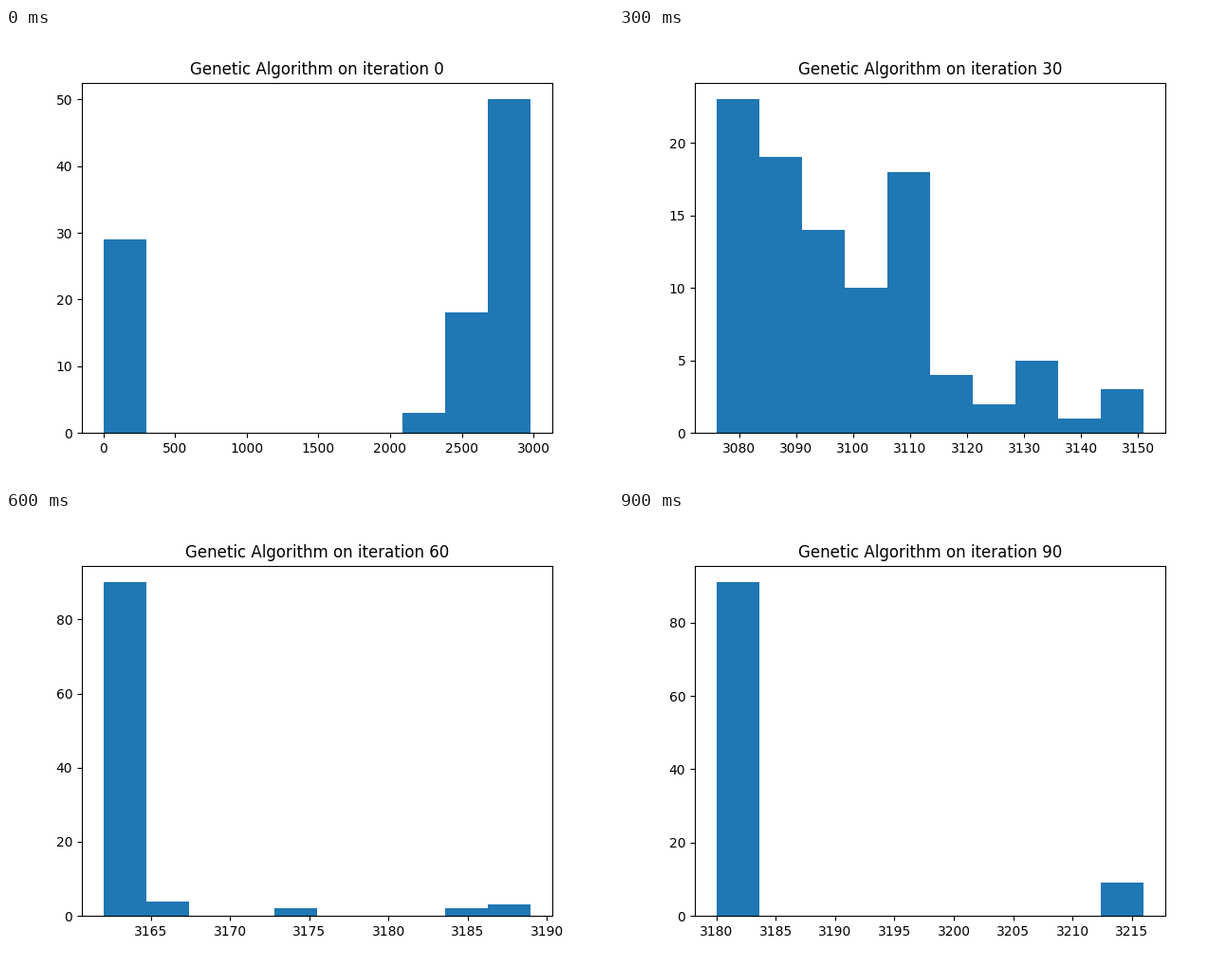
Recreate the animation shown at these times as a matplotlib script. Size 640x480 px, loop 1910 ms.

```python
import numpy as np
import matplotlib.pyplot as plt
from matplotlib.animation import FuncAnimation

STEP = 10        # ms per tick
HOLD = 100       # ms per histogram; the last one stays to the end
LOOP = 1910      # ms
BINS = 10
STAGES = 10

# stage: (lowest score, highest score, clusters as (bin, size, spread))
KEYS = {
    0: (0, 2982, [(0, 29, 0.3), (9, 50, 0.99)]),
    1: (2878, 3004, [(0, 22, 3.8), (5.6, 8.5, 0.9), (9, 2, 0.3)]),
    3: (3076, 3151, [(0, 23, 3.2), (4, 12, 0.5), (7, 4, 0.5), (9, 3, 0.5)]),
    4: (3118, 3151, [(0, 15, 3.6), (3.2, 14, 0.6), (5.8, 11, 0.6),
                     (8.4, 12, 0.8)]),
    5: (3151, 3163, [(0, 85, 0.4), (4.2, 3.3, 0.7), (8.7, 6, 0.9)]),
    7: (3174, 3215, [(0, 94, 0.485), (9, 1, 0.3)]),
    9: (3180, 3216, [(0, 91, 0.3), (9, 9, 0.3)]),
}

plt.rcParams["font.family"] = "DejaVu Sans"
fig = plt.figure(figsize=(6.4, 4.8), dpi=100, facecolor="white")


def cluster(center, size, spread):
    """Bell-like group of individuals around one bin."""
    distance = np.abs(np.arange(BINS) - center)
    return size * np.exp(-(distance / spread) ** 1.5)


def population(low, high, clusters):
    counts = np.rint(sum(cluster(*c) for c in clusters))
    return [low, high, *counts]


KEY_ROWS = np.array([population(*key) for key in KEYS.values()])


def histogram(stage):
    # Stages between two keys are a blend of both
    row = [np.interp(stage, list(KEYS), column) for column in KEY_ROWS.T]
    low, high, *counts = np.rint(row)
    edges = np.linspace(low, high, BINS + 1)
    ax = fig.add_subplot()
    ax.hist(edges[:-1], bins=edges, weights=counts, color="#1f77b4")
    ax.set_title(f"Genetic Algorithm on iteration {stage * 10}")
    ax.set_visible(stage == 0)
    return ax


plots = [histogram(stage) for stage in range(STAGES)]


def update(tick):
    current = min(tick * STEP // HOLD, STAGES - 1)
    for stage, ax in enumerate(plots):
        ax.set_visible(stage == current)
    return plots


anim = FuncAnimation(fig, update, frames=LOOP // STEP, interval=STEP,
                     repeat=True, repeat_delay=0, blit=False)
plt.show()
```
